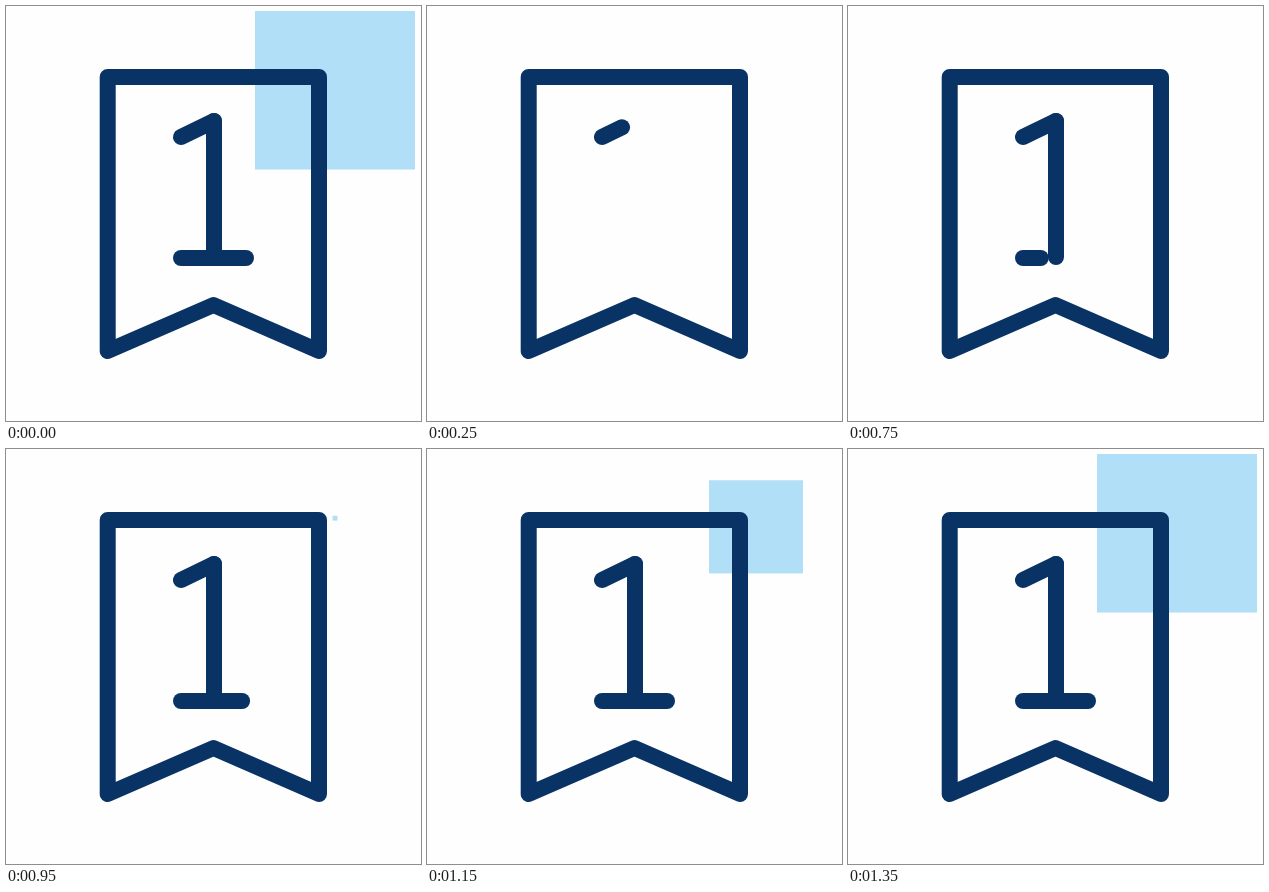
Animation of 415 by 415 pixels, one loop 1450 ms. Source, as an HTML page:

```html
<!DOCTYPE html>
<html lang="en">
<head>
<meta charset="utf-8">
<title>Ribbon</title>
<style>
  html, body { margin: 0; height: 100%; overflow: hidden; background: #fefefe; }
  svg { display: block; width: 100vw; height: 100vh; }
</style>
</head>
<body>
<svg viewBox="0 0 415 415">
  <rect id="square" fill="#b2dff8"/>
  <g fill="none" stroke="#093364" stroke-width="16" stroke-linecap="round" stroke-linejoin="round">
    <path d="M101.7 71H313V345L207.5 299L101.7 345Z"/>
    <line class="stroke"/>
    <line class="stroke"/>
    <line class="stroke"/>
  </g>
</svg>
<script>
const LOOP = 1450, STEP = 50;
const START = 68, STROKE_TIME = 300;
const GROW_START = 939, GROW_TIME = 359;
const segments = [[175, 131, 208, 115], [208, 115, 208, 251], [175, 252, 240, 252]];
const lines = document.querySelectorAll('.stroke');
const square = document.getElementById('square');

const progress = (t, start, length) => Math.min(1, Math.max(0, (t - start) / length));

function setAttributes(element, values) {
  for (const name in values) element.setAttribute(name, values[name]);
}

function draw(now) {
  let t = Math.floor((now % LOOP) / STEP) * STEP;
  if (t < START) t += LOOP; // the finished picture holds into the next loop

  segments.forEach(([x1, y1, x2, y2], i) => {
    const p = progress(t, START + i * STROKE_TIME, STROKE_TIME);
    setAttributes(lines[i], {
      x1, y1,
      x2: x1 + (x2 - x1) * p,
      y2: y1 + (y2 - y1) * p,
      visibility: p > 0 ? 'visible' : 'hidden'
    });
  });

  const s = progress(t, GROW_START, GROW_TIME);
  setAttributes(square, { x: 329 - 80 * s, y: 68.7 - 63.7 * s, width: 160 * s, height: 158.5 * s });
  requestAnimationFrame(draw);
}
requestAnimationFrame(draw);
</script>
</body>
</html>
```
